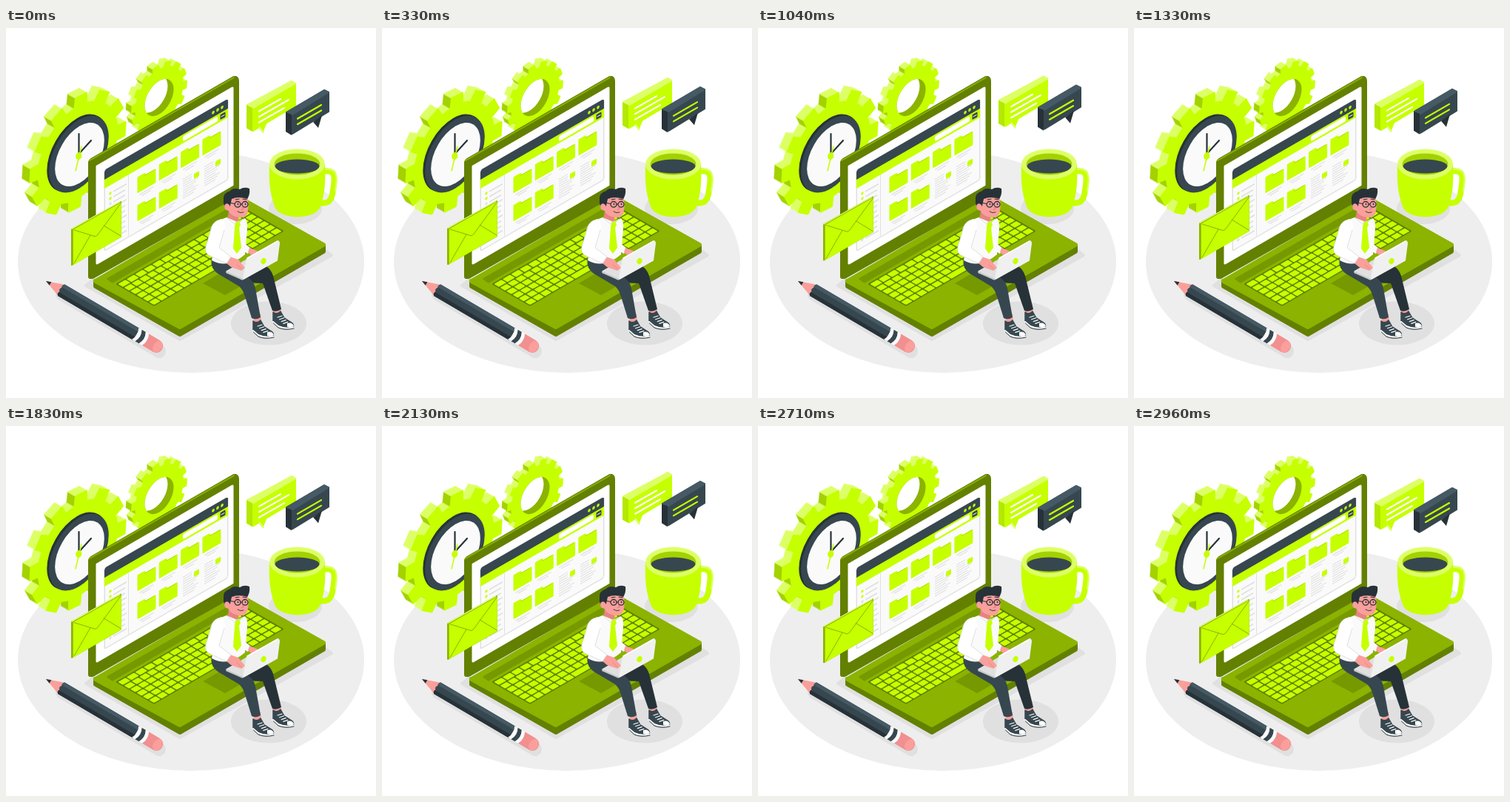
An HTML page with a canvas for the animation above (3000 ms loop, 500x500 px).

```html
<!DOCTYPE html>
<html>
<head>
<meta charset="utf-8">
<style>
html, body { margin: 0; width: 100%; height: 100%; overflow: hidden; background: #fff; }
canvas { display: block; width: 500px; height: 500px; }
</style>
</head>
<body>
<canvas id="stage"></canvas>
<script>
const LOOP = 3000;
const LIME = '#c6ff00', PALE = '#ddff66', MID = '#a3d200', OLIVE = '#8bb300', MOSS = '#638000';
const NAVY = '#37474f', INK = '#263238', SLATE = '#455a64';
const SHADE = '#e0e0e0', SKIN = '#fa9f9b', WHITE = '#fff', PAPER = '#fafafa';
const TILT = 0.577;

const dpr = Math.max(1, window.devicePixelRatio || 1);
const stage = document.getElementById('stage');
const still = document.createElement('canvas');
stage.width = stage.height = still.width = still.height = 500 * dpr;
const screen = stage.getContext('2d');
let g = still.getContext('2d');
g.scale(dpr, dpr);

function shape(d, color) {
  g.fillStyle = color;
  g.fill(new Path2D(d));
}

function line(d, color, width) {
  g.strokeStyle = color;
  g.lineWidth = width;
  g.lineCap = g.lineJoin = 'round';
  g.stroke(new Path2D(d));
}

function soft(d, color, round) {
  shape(d, color);
  line(d, color, round);
}

function oval(x, y, rx, ry, color, turn = 0) {
  g.fillStyle = color;
  g.beginPath();
  g.ellipse(x, y, rx, ry, turn, 0, 7);
  g.fill();
}

function box(x, y, w, h, color, r = 0) {
  g.fillStyle = color;
  g.beginPath();
  g.roundRect(x, y, w, h, r);
  g.fill();
}

function within(matrix, draw) {
  g.save();
  g.transform(...matrix);
  draw();
  g.restore();
}

// Upright wall running up to the right; x stays in screen pixels.
const wall = (x, y, draw) => within([1, -TILT, 0, 1, x, y], draw);
const desk = (x, y, draw) => within([1, -TILT, 1, TILT, x, y], draw);
const disc = (x, y, r, color) =>
  within([0.866, -0.5, 0, 1, x, y], () => oval(0, 0, r, r, color));

function gear(cx, cy, inner, outer, teeth, phase, depth) {
  const back = [-0.866 * depth, -0.5 * depth];
  const step = 2 * Math.PI / teeth;
  const pts = [];
  for (let i = 0; i < teeth; i++) {
    const a = phase + i * step;
    for (const [k, r] of [[-0.3, inner], [-0.23, outer], [0.23, outer], [0.3, inner]]) {
      const u = r * Math.cos(a + k * step), v = r * Math.sin(a + k * step);
      pts.push({ u, x: cx + 0.866 * u, y: cy - 0.5 * u + v });
    }
  }
  pts.forEach((p, i) => {
    const q = pts[(i + 1) % pts.length];
    const ex = q.x - p.x, ey = q.y - p.y;
    if (ey * back[0] - ex * back[1] <= 0) return;
    const up = (q.u - p.u) / Math.hypot(ex, ey) > 0.2;
    soft(`M${p.x} ${p.y}L${q.x} ${q.y}l${back}l${-ex} ${-ey}z`, up ? PALE : MID, 0.6);
  });
  soft('M' + pts.map(p => p.x + ' ' + p.y).join('L') + 'z', LIME, 1.5);
}

function gears() {
  gear(207, 93, 37, 43, 14, 0.1, 9);
  disc(207, 94, 22.5, OLIVE);
  g.save();
  g.beginPath();
  within([0.866, -0.5, 0, 1, 207, 94], () => g.arc(0, 0, 22.5, 0, 7));
  g.clip();
  disc(199, 89.5, 22.5, WHITE);
  g.restore();

  gear(97, 168, 62, 75, 12, 0.07, 12);
  disc(96, 169, 47, INK);
  disc(98.5, 170.5, 46.5, NAVY);
  disc(99.5, 171, 38.5, PAPER);
  line('M98.5 143V170L115 152', INK, 2.2);
  line('M102 160L94 193', LIME, 1.5);
  oval(98.3, 173, 4, 5, LIME, 0.3);
}

function folder(x, y) {
  soft(`M${x} ${y + 1}h8l2 3h13v17h-23z`, LIME, 2);
  line(`M${x + 9} ${y + 3.6}h13`, MID, 0.6);
  box(x + 2, y + 25, 19, 1.3, SHADE);
  box(x + 5, y + 28, 12, 1.3, SHADE);
}

function note(x, y) {
  for (let i = 0; i < 9; i++) box(x, y + i * 3.2, i < 3 ? 12 : 21 - i % 3 * 3, 1.2, SHADE);
  box(x + 15, y + 2, 7, 7, LIME, 1);
}

function browser() {
  wall(133, 192, () => {
    box(-0.5, 0, 168, 110, SHADE, 3);
    box(1, 1, 165, 107.5, PAPER, 2);
    box(0, 0, 167, 14, NAVY, [3, 3, 0, 0]);
    box(0, 13, 167, 12, LIME);
    box(106, 15.5, 47, 7, WHITE, 2);
    box(156.5, 15.5, 7, 7, NAVY, 1);
    line('M158 19h4', WHITE, 1);
    for (let i = 0; i < 3; i++) oval(147 + i * 6, 7, 1.8, 2.1, LIME);
    box(32, 25, 1, 83, SHADE);
    for (let i = 0; i < 10; i++) {
      oval(8, 36 + i * 7, 1.6, 1.8, i < 2 ? LIME : SHADE);
      box(12, 35 + i * 7, i % 3 ? 16 : 18, 2, SHADE);
    }
    for (let i = 0; i < 4; i++) folder(45.5 + i * 29.3, 35);
    folder(45.5, 73);
    folder(74.8, 73);
    note(106, 73);
    note(135, 73);
  });
}

function keyboard() {
  desk(150, 346, () => {
    box(-1, -1, 176, 52, MOSS, 2);
    for (let r = 0; r < 6; r++) {
      const w = r === 0 ? 11.6 : 10.24;
      for (let c = 0; c * w < 173; c++) {
        if (r === 5 && c > 5 && c < 10) continue;
        box(c * w + 0.6, r * 8.4 + 0.6, Math.min(w, 174 - c * w) - 1.5, 6.8, LIME, 1);
      }
    }
    box(62, 42.6, 39.4, 6.8, LIME, 1);
  });
}

function laptop() {
  soft('M108 348L235 421L440 307L425 296L235 404L118 340z', SHADE, 4);
  soft('M121 342L235 405L429 294V302L235 414L121 349z', MOSS, 6);
  soft('M121 342L235 404L429 293L315 229z', OLIVE, 6);
  soft('M138 339L144 343L318 242L311 239z', '#769900', 3);
  keyboard();
  shape('M266 345L296 361L342 335L312 318z', '#769900');

  soft('M114 182Q114 180 117 178L307 68.5Q312 66 312 72V225L117 336H114z', MOSS, 6);
  line('M113 179L308 67', OLIVE, 1.6);
  soft('M123 187L306 81V212L123 318z', WHITE, 3);
  browser();
}

function pencil() {
  line('M76 360L207 437', SHADE, 18);
  within([0.862, 0.507, -0.507, 0.862, 54, 342], () => {
    shape('M0 0L25 -9V9z', SKIN);
    shape('M0 0L7 -2.6V2.6z', INK);
    shape('M24 -9H142V9H24Q21 6 23 3Q20 0 23 -3Q21 -6 24 -9z', NAVY);
    shape('M23 -3Q21 -6 24 -9H142V-4H23z', SLATE);
    shape('M23 4H142V9H24Q21 7 23 4z', INK);
    shape('M140 -9H158V9H140Q145 0 140 -9z', PAPER);
    shape('M145 -9H151Q156 0 151 9H145Q150 0 145 -9z', NAVY);
    shape('M156 -9H173Q182 -8 182 0T173 9H156Q161 0 156 -9z', '#f28f8f');
    oval(175, 0, 6, 8.5, SKIN);
  });
}

function mug() {
  oval(391, 244, 36, 21, SHADE);
  line('M428 194C448 190 444 205 442 219C440 235 435 238 423 236', LIME, 8);
  line('M431 191C451 189 447 206 445 220', PALE, 2);
  shape('M356 184C355 209 357 225 363 241C369 260 419 260 425 241C431 225 432 207 431 184z', LIME);
  oval(393.5, 184, 37.5, 20.5, PALE);
  oval(393.5, 184, 31, 14.5, MID);
  g.save();
  g.beginPath();
  g.ellipse(393.5, 184, 31, 14.5, 0, 0, 7);
  g.clip();
  oval(393.5, 187, 30, 9.5, NAVY);
  g.restore();
}

function shoe(x, y) {
  g.save();
  g.translate(x, y);
  soft('M1 2Q6 6 11 1L16 10L27 17Q31 22 25 23Q15 25 7 20L1 14z', NAVY, 1.5);
  line('M1 15L8 21Q17 25 28 23', WHITE, 2);
  line('M1.5 17L8 23Q17 27 29 24', INK, 1);
  for (let i = 0; i < 4; i++) line(`M${7 + i * 2.6} ${9 + i * 2.8}l6 -2`, WHITE, 1.2);
  shape('M20 17Q27 15 29 21Q25 24 20 22z', WHITE);
  g.restore();
}

function man() {
  oval(355, 399, 51, 29.5, SHADE);
  // legs
  shape('M334 388L344 386L345 397Q339 400 335 397z', SKIN);
  shape('M361 378L371 377L372 386Q366 389 362 386z', SKIN);
  shoe(333, 394);
  shoe(360, 382);
  shape('M300 316L344 318Q359 323 362 339L372 380Q366 384 360 382L347 345L320 344z', INK);
  shape('M278 311Q275 325 288 333L315 349Q320 353 323 363L332 392Q338 395 344 391L337 352Q335 341 325 336L309 319z', NAVY);
  // torso
  shape('M301 247L314 254L315 266L299 260z', '#e58580');
  shape('M298 256L315 263L323 257Q327 262 326 273L323 306Q300 326 278 314L282 287L285 261z', PAPER);
  shape('M310 262L315 261L317 266L315 270L318 297L312 305L307 298L309 270z', LIME);
  line('M299 257L309 265L314 261L321 258', SHADE, 1);
  shape('M320 289L331 298L327 305L319 301z', PAPER);
  shape('M329 297L341 302L343 308L334 309L327 303z', SKIN);
  // computer on the lap
  soft('M298 329L318 339L358 317L336 307z', SHADE, 1.5);
  shape('M298 329L320 339V341L297 331z', '#c7c7c7');
  soft('M326 312L366 289Q369 287 369 291L366 314L321 339z', '#f0f0f0', 2);
  line('M326 311L367 288', WHITE, 1.5);
  oval(348, 315, 3.4, 4.2, LIME, 0.5);
  // near arm
  shape('M297 307L314 313L323 324L318 328L304 323L297 317z', SKIN);
  line('M312 320L319 326', '#e58580', 0.8);
  shape('M286 260Q278 263 276 276L270 296Q268 304 276 308L298 318L304 309L288 297L295 276Q299 263 291 258z', WHITE);
  line('M295 273L288 297L304 309L298 318L276 308Q268 304 270 296L276 276Q278 263 286 260', SHADE, 1);
  // head
  shape('M301 227L325 223Q329 236 327 246Q326 257 315 256Q303 254 300 246z', SKIN);
  shape('M294 232Q293 223 303 220Q307 215 316 218Q322 214 329 217Q330 225 326 231Q314 227 305 231L303 240L299 247Q293 240 294 232z', INK);
  oval(299, 242, 3.8, 4.8, SKIN, -0.3);
  line('M301 236L309 237.5M317 238h2', INK, 1.2);
  for (const x of [313, 323]) {
    g.strokeStyle = INK;
    g.lineWidth = 1.3;
    g.beginPath();
    g.ellipse(x, 238.3, 4, 3.8, 0, 0, 7);
    g.stroke();
    oval(x + 0.5, 238, 0.9, 1.2, INK);
  }
  line('M310 232l5 -1M320 231l5 1', INK, 1.2);
  line('M319 240L321 245L318 245.5', '#e0716d', 0.8);
  line('M313 248Q317 251 321 249', INK, 0.9);
}

function envelope() {
  soft('M89 272L155 235V282L89 320z', OLIVE, 2);
  soft('M91.5 273L155 237V282L91.5 319z', LIME, 1.6);
  line('M89 271.5L154 235', PALE, 1.3);
  line('M92 273L118 281Q122 283 125 278L155 237M92 318L114 280M155 281L132 267', OLIVE, 1);
}

function bubbles() {
  soft('M326 105L386 72L391 75V105L334 139L326 135z', LIME, 2);
  soft('M326 104L386 72L391 75L334 108z', PALE, 2);
  shape('M325 104L333 108V140L325 135z', '#b4e800');
  shape('M341 134L347 142L353 127z', LIME);
  shape('M341 134L347 142L349 141L343 133z', PALE);
  line('M342 112.5L371 96M342 120L382 97M342 127.5L376 108', WHITE, 2.2);

  soft('M379 114L430 84L436 87V113L387 143L379 139z', NAVY, 2);
  soft('M379 114L430 84L436 87L387 117z', SLATE, 2);
  shape('M378 114L386 117V145L378 140z', INK);
  shape('M415 127L422 135L427 118z', INK);
  line('M394 122.5L426 104M394 130L426 111.5', LIME, 2.2);
}

function scenery() {
  oval(250, 316, 234, 150, '#eee');
  gears();
  pencil();
  mug();
  laptop();
  man();
}

// Rise from rest and back again, once per period.
const lift = (t, period, height) => -height * (1 - Math.cos(2 * Math.PI * t / period)) / 2;

function floating(dy, draw) {
  within([1, 0, 0, 1, 0, dy], draw);
}

function frame(now) {
  const t = (now - start) % LOOP;
  g.setTransform(dpr, 0, 0, dpr, 0, 0);
  g.fillStyle = WHITE;
  g.fillRect(0, 0, 500, 500);
  g.drawImage(still, 0, 0, 500, 500);
  floating(lift(t, LOOP, 8.3), envelope);
  floating(lift(t, LOOP / 2, 9.4), bubbles);
  requestAnimationFrame(frame);
}

scenery();
g = screen;
const start = performance.now();
frame(start);
</script>
</body>
</html>
```
